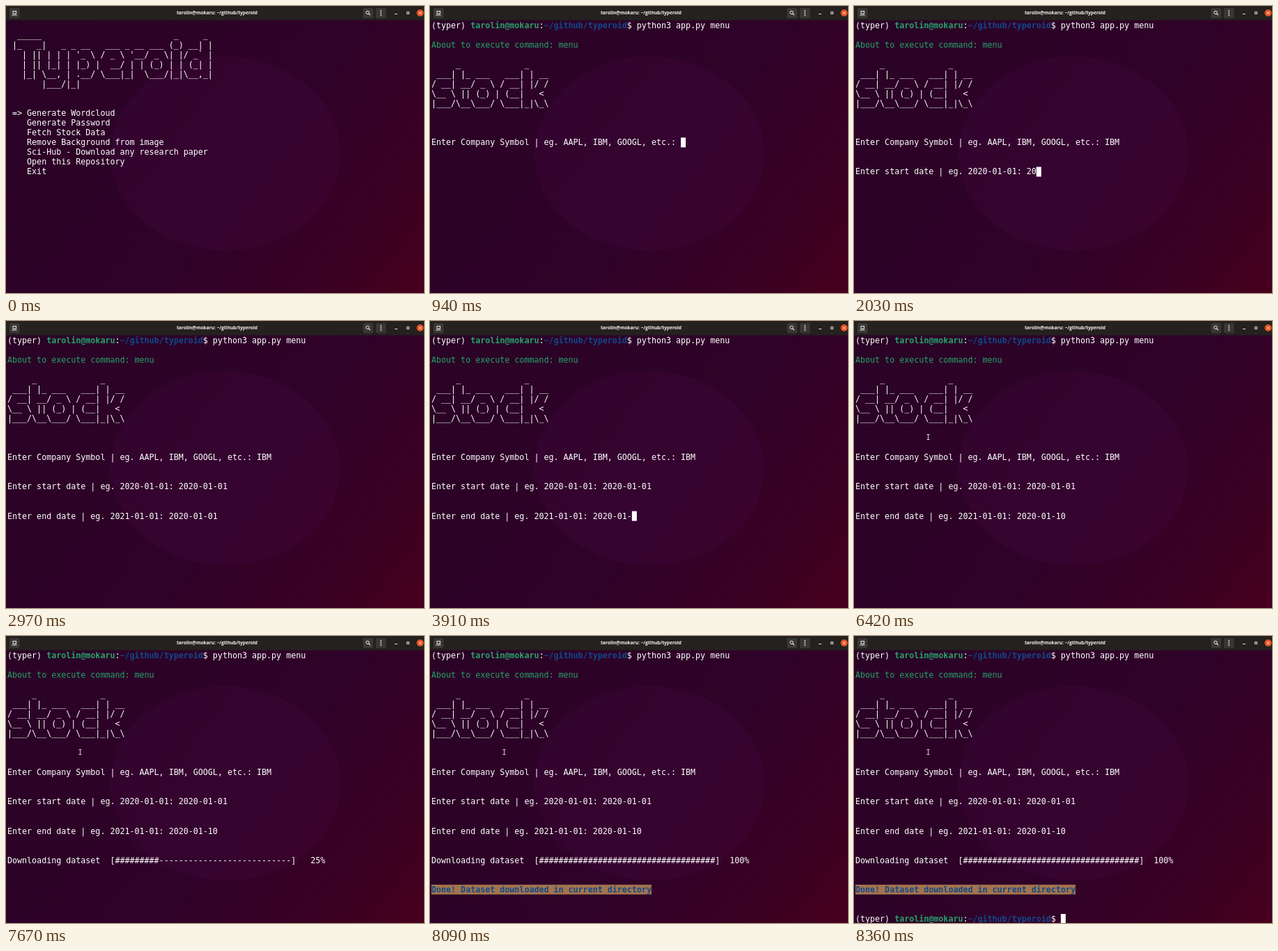
An HTML page with a canvas for the animation above (8390 ms loop, 600 by 413 pixels).

```html
<!DOCTYPE html>
<html lang="en">
<head>
<meta charset="utf-8">
<title>Terminal session</title>
<style>
  html, body { margin: 0; width: 100%; height: 100%; overflow: hidden; background: #2c0327; }
  canvas { display: block; width: 600px; height: 413px; }
</style>
</head>
<body>
<canvas id="stage" width="600" height="413"></canvas>
<script>
const ctx = document.getElementById('stage').getContext('2d');

const LOOP = 8390, BLINK = 333;
const LEFT = 2, TOP = 20.9, CELL = 7.02, LINE = 14.04, BASELINE = 10.9;
const WHITE = '#fff', GREEN = '#26a269', BLUE = '#12488b', TAN = '#a2734c';
const MONO = '11.66px "DejaVu Sans Mono", monospace';

const HOST = 'tarolin@mokaru', FOLDER = '~/github/typeroid';
const MENU = [
  'Generate Wordcloud', 'Generate Password', 'Fetch Stock Data',
  'Remove Background from image', 'Sci-Hub - Download any research paper',
  'Open this Repository', 'Exit'
];
const MENU_BANNER = String.raw`
 _____                           _     _
|_   _|   _ _ __   ___ _ __ ___ (_) __| |
  | || | | | '_ \ / _ \ '__/ _ \| |/ _${'`'} |
  | || |_| | |_) |  __/ | | (_) | | (_| |
  |_| \__, | .__/ \___|_|  \___/|_|\__,_|
      |___/|_|
`.split('\n').slice(1);
const STOCK_BANNER = String.raw`
     _             _
 ___| |_ ___   ___| | __
/ __| __/ _ \ / __| |/ /
\__ \ || (_) | (__|   <
|___/\__\___/ \___|_|\_\
`.split('\n').slice(1);

// Moments of the session, in ms
const AT = {
  down1: 60, down2: 390, select: 690, symbolEnter: 1780, startEnter: 2300,
  endEnter: 4680, pointer: 6000, barStart: 7530, barEnd: 8080, done: 8090, prompt: 8140
};

function rect(x, y, w, h, color) {
  ctx.fillStyle = color;
  ctx.fillRect(x, y, w, h);
}

function stroke(color, width, ...lines) {
  ctx.strokeStyle = color;
  ctx.lineWidth = width;
  ctx.beginPath();
  for (const [x1, y1, x2, y2] of lines) { ctx.moveTo(x1, y1); ctx.lineTo(x2, y2); }
  ctx.stroke();
}

function disc(x, y, r, color) {
  ctx.fillStyle = color;
  ctx.beginPath();
  ctx.arc(x, y, r, 0, 2 * Math.PI);
  ctx.fill();
}

// Writes on the character grid and returns the next column.
function put(row, col, text, color = WHITE, bold = false) {
  ctx.font = (bold ? 'bold ' : '') + MONO;
  ctx.fillStyle = color;
  ctx.textAlign = 'left';
  [...text].forEach((ch, i) =>
    ctx.fillText(ch, LEFT + (col + i) * CELL, TOP + row * LINE + BASELINE));
  return col + text.length;
}

function putLines(row, col, lines) {
  lines.forEach((line, i) => put(row + i, col, line));
}

function shellPrompt(row) {
  let col = put(row, 0, '(typer) ');
  col = put(row, col, HOST, GREEN, true);
  col = put(row, col, ':');
  col = put(row, col, FOLDER, BLUE, true);
  return put(row, col, '$ ');
}

function wallpaper() {
  const base = ctx.createLinearGradient(60, 0, 600, 413);
  base.addColorStop(0, '#2a0326');
  base.addColorStop(0.55, '#300229');
  base.addColorStop(0.8, '#390124');
  base.addColorStop(1, '#47001d');
  rect(0, 0, 600, 413, base);
  ctx.fillStyle = 'rgba(74, 10, 76, 0.2)';
  ctx.beginPath();
  ctx.ellipse(315, 212, 165, 140, 0, 0, 2 * Math.PI);
  ctx.fill();
}

function titleBar() {
  rect(0, 0, 600, 20.5, '#24211f');
  for (const x of [5, 512.5, 531]) {
    ctx.fillStyle = '#3a3735';
    ctx.beginPath();
    ctx.roundRect(x, 3, 14.5, 14.5, 2);
    ctx.fill();
  }
  ctx.strokeStyle = '#eee';
  ctx.lineWidth = 1;
  ctx.strokeRect(10, 7.5, 4.5, 3.5);
  stroke('#eee', 1, [8.5, 13, 15.5, 13]);

  ctx.beginPath();
  ctx.arc(519, 9.3, 2.2, 0, 2 * Math.PI);
  ctx.stroke();
  stroke('#eee', 1.2, [520.6, 11, 522.8, 13.2]);
  for (const y of [7, 10, 13]) disc(538.2, y, 0.9, '#eee');

  stroke('#ddd', 1, [558, 11.5, 562, 11.5]);
  ctx.strokeRect(575.5, 8.5, 3, 3);
  disc(594.5, 10, 5, '#e95420');
  stroke('#fff', 0.9, [592.7, 8.2, 596.3, 11.8], [596.3, 8.2, 592.7, 11.8]);

  ctx.font = 'bold 6.6px "Open Sans", "Noto Sans", sans-serif';
  ctx.fillStyle = '#f4f2f0';
  ctx.textAlign = 'center';
  ctx.fillText(`${HOST}: ${FOLDER}`, 303, 12.3);
}

function menuScreen(t) {
  putLines(1, 1, MENU_BANNER);
  putLines(9, 4, MENU);
  put(9 + (t >= AT.down1) + (t >= AT.down2), 1, '=>');
}

function stockScreen(t) {
  let lastKey = AT.select;
  let cursor;

  const typed = (keys, start, gap, text = '') => {
    [...keys].forEach((key, i) => {
      const pressed = start + i * gap;
      if (t < pressed) return;
      text = key === '\b' ? text.slice(0, -1) : text + key;
      lastKey = pressed;
    });
    return text;
  };
  const ask = (row, label, answer) => { cursor = [row, put(row, 0, label + answer)]; };
  const reached = time => {
    if (t < time) return false;
    lastKey = time;
    return true;
  };

  put(0, shellPrompt(0), 'python3 app.py menu');
  put(2, 0, 'About to execute command: menu', GREEN);
  putLines(4, 0, STOCK_BANNER);

  ask(12, 'Enter Company Symbol | eg. AAPL, IBM, GOOGL, etc.: ', typed('IBM', 1380, 110));
  if (reached(AT.symbolEnter))
    ask(15, 'Enter start date | eg. 2020-01-01: ', typed('2020-01-01', 1990, 30));
  if (reached(AT.startEnter)) {
    const firstTry = typed('2020-01-01', 2330, 30);
    ask(18, 'Enter end date | eg. 2021-01-01: ', typed('\b\b10', 3700, 180, firstTry));
  }
  if (reached(AT.endEnter)) cursor = [21, 0];

  if (t >= AT.barStart) {
    const done = Math.min(1, (t - AT.barStart) / (AT.barEnd - AT.barStart));
    const percent = Math.floor(done * 100);
    const bar = '#'.repeat(Math.floor(percent * 0.36)).padEnd(36, '-');
    put(21, 0, `Downloading dataset  [${bar}]  ${(percent + '%').padStart(4)}`);
    cursor = null;
  }
  if (t >= AT.done) {
    const message = 'Done! Dataset downloaded in current directory';
    rect(LEFT, TOP + 24 * LINE, message.length * CELL, LINE, TAN);
    put(24, 0, message, BLUE, true);
  }
  if (reached(AT.prompt)) cursor = [27, shellPrompt(27)];

  if (cursor && Math.floor((t - lastKey) / BLINK) % 2 === 0)
    rect(LEFT + cursor[1] * CELL, TOP + cursor[0] * LINE, CELL, LINE, WHITE);

  if (t >= AT.pointer)
    stroke('#d8cfd6', 1, [106.5, 163.5, 106.5, 170.5], [104.5, 163.5, 108.5, 163.5], [104.5, 170.5, 108.5, 170.5]);
}

function draw() {
  const t = performance.now() % LOOP;
  wallpaper();
  titleBar();
  if (t < AT.select) menuScreen(t);
  else stockScreen(t);
  requestAnimationFrame(draw);
}
draw();
</script>
</body>
</html>
```
